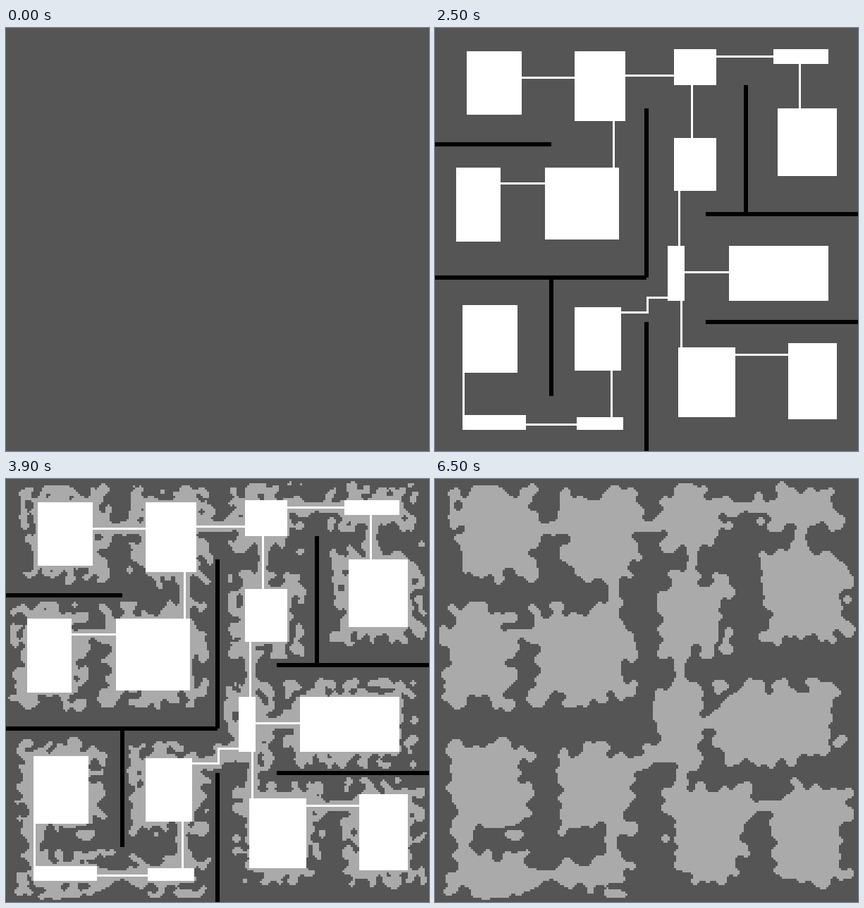
An HTML page with a canvas that plays this animation: 600x600 px, repeating every 8000 ms.

```html
<!DOCTYPE html>
<html>
<head>
<meta charset="utf-8">
<style>
  html, body { margin: 0; height: 100%; overflow: hidden; background: #555; }
  canvas, svg { position: absolute; left: 0; top: 0; width: 600px; height: 600px; }
  canvas { image-rendering: pixelated; }
  rect { fill: #fff; }
  #borders rect { fill: none; stroke: #0f0; }
  #walls rect { fill: #000; }
  line { stroke: #f00; }
  #neighbours line { stroke-width: .33334; }
</style>
</head>
<body>
<canvas width="200" height="200"></canvas>
<svg viewBox="0 0 200 200" shape-rendering="crispEdges">
  <g id="rooms"></g>
  <g id="corridors"></g>
  <g id="walls"></g>
  <g id="borders"></g>
  <g id="neighbours"></g>
  <g id="tree"></g>
</svg>
<script>
const SIZE = 200, LOOP = 8000, STEPS = 15, ROOM_PAD = 9, CORRIDOR_PAD = 3;
const ctx = document.querySelector('canvas').getContext('2d');

// Binary space partition in preorder: axis and position of each cut, '.' for a leaf.
const cuts = ('x100 y118 y55 x55 . . x42 . . x55 y173 . . y174 . . ' +
  'y88 x147 y38 . . y27 . . y139 x128 . . x156 . .').split(' ');

// x, y, width, height in cells, one room per leaf.
const rooms = [
  [15, 11, 26, 30], [66, 11, 24, 33], [10, 66, 21, 35], [52, 66, 35, 34],
  [13, 131, 26, 32], [13, 183, 30, 7], [66, 132, 22, 30], [67, 184, 22, 6],
  [113, 10, 20, 17], [113, 52, 20, 25], [160, 10, 26, 7], [162, 38, 28, 32],
  [110, 103, 8, 26], [139, 103, 47, 26], [115, 151, 27, 33], [167, 149, 23, 36]
];

// Spanning tree: cross position of the corridor, two values when it bends.
const links = {
  '0-1': [23], '1-3': [84], '2-3': [73], '1-8': [22], '8-10': [13],
  '10-11': [172], '8-9': [121], '9-12': [115], '12-13': [115], '12-14': [116],
  '14-15': [154], '6-12': [134, 127], '6-7': [83], '5-7': [187], '4-5': [13]
};

const leaves = [];
function split(x0, y0, x1, y1) {
  const cut = cuts.shift(), at = +cut.slice(1);
  if (cut === '.') {
    leaves.push({ x0, y0, x1, y1, cx: (x0 + x1) >> 1, cy: (y0 + y1) >> 1 });
  } else if (cut[0] === 'x') {
    split(x0, y0, at, y1);
    split(at, y0, x1, y1);
  } else {
    split(x0, y0, x1, at);
    split(x0, at, x1, y1);
  }
}
split(0, 0, SIZE, SIZE);

function draw(group, tag, attributes) {
  const node = document.createElementNS('http://www.w3.org/2000/svg', tag);
  for (const name in attributes) node.setAttribute(name, attributes[name]);
  document.getElementById(group).append(node);
}
const drawRect = (group, [x, y, width, height]) => draw(group, 'rect', { x, y, width, height });
const drawLine = (group, a, b) =>
  draw(group, 'line', { x1: a.cx, y1: a.cy, x2: b.cx, y2: b.cy });

function corridorRects(a, b, sideways, border, [from, to = from]) {
  const [ax, ay, aw, ah] = rooms[a], [bx, by] = rooms[b];
  if (!sideways) return [[from, ay + ah, 1, by - ay - ah]];
  return [
    [ax + aw, from, border - ax - aw + 1, 1],
    [border, Math.min(from, to), 1, Math.abs(from - to) + 1],
    [border, to, bx - border, 1]
  ];
}

const corridors = [], walls = [];
leaves.forEach((a, i) => {
  drawRect('borders', [a.x0, a.y0, a.x1 - a.x0, a.y1 - a.y0]);
  leaves.forEach((b, j) => {
    const left = Math.max(a.x0, b.x0), width = Math.min(a.x1, b.x1) - left;
    const top = Math.max(a.y0, b.y0), height = Math.min(a.y1, b.y1) - top;
    const sideways = a.x1 === b.x0 && height > 0;
    if (!sideways && !(a.y1 === b.y0 && width > 0)) return;
    drawLine('neighbours', a, b);
    const link = links[`${i}-${j}`];
    if (link) {
      drawLine('tree', a, b);
      corridors.push(...corridorRects(i, j, sideways, a.x1, link));
    } else {
      walls.push(sideways ? [a.x1 - 1, top, 2, height] : [left, a.y1 - 1, width, 2]);
    }
  });
});
rooms.forEach(r => drawRect('rooms', r));
corridors.forEach(r => drawRect('corridors', r));
walls.forEach(r => drawRect('walls', r));

let seed = 20;
function random() {
  seed = (seed + 0x6D2B79F5) | 0;
  let r = Math.imul(seed ^ (seed >>> 15), 1 | seed);
  r = (r + Math.imul(r ^ (r >>> 7), 61 | r)) ^ r;
  return ((r ^ (r >>> 14)) >>> 0) / 4294967296;
}

function fill(grid, [x, y, w, h], value, pad = 0) {
  for (let v = Math.max(0, y - pad); v < Math.min(SIZE, y + h + pad); v++)
    for (let u = Math.max(0, x - pad); u < Math.min(SIZE, x + w + pad); u++)
      grid[v * SIZE + u] = value;
}

// The floor of a corridor reaches one cell beyond its white line.
const newGrid = () => new Uint8Array(SIZE * SIZE);
const FLOOR = 1, WALL = 2;
const noisy = newGrid(), fixed = newGrid();
rooms.forEach(r => fill(noisy, r, 1, ROOM_PAD));
corridors.forEach(r => fill(noisy, r, 1, CORRIDOR_PAD));
walls.forEach(r => fill(fixed, r, WALL));
rooms.forEach(r => fill(fixed, r, FLOOR));
corridors.forEach(r => fill(fixed, r, FLOOR, 1));

// Majority vote of the eight neighbours; a tie keeps the cell.
function smooth(grid) {
  const at = (x, y) => x >= 0 && y >= 0 && x < SIZE && y < SIZE ? grid[y * SIZE + x] : 0;
  return grid.map((cell, i) => {
    if (fixed[i]) return cell;
    const x = i % SIZE, y = (i - x) / SIZE;
    const count = at(x - 1, y - 1) + at(x, y - 1) + at(x + 1, y - 1) + at(x - 1, y) +
      at(x + 1, y) + at(x - 1, y + 1) + at(x, y + 1) + at(x + 1, y + 1);
    return count === 4 ? cell : +(count > 4);
  });
}

const caves = [noisy.map((n, i) => fixed[i] ? +(fixed[i] === FLOOR) : +(n && random() < .5))];
while (caves.length <= STEPS) caves.push(smooth(caves[caves.length - 1]));

function paintCave(step) {
  ctx.clearRect(0, 0, SIZE, SIZE);
  if (step < 0) return;
  ctx.fillStyle = '#aaa';
  caves[step].forEach((cell, i) => {
    if (cell) ctx.fillRect(i % SIZE, Math.floor(i / SIZE), 1, 1);
  });
}

const shown = {
  borders: [500, 2500], rooms: [1000, 6500], neighbours: [1500, 2500],
  tree: [2000, 2500], corridors: [2500, 6500], walls: [2500, 6500]
};
let painted = -1;
function frame() {
  const t = performance.now() % LOOP;
  for (const id in shown) {
    const [from, to] = shown[id];
    document.getElementById(id).style.display = t >= from && t < to ? '' : 'none';
  }
  const step = t < 3000 ? -1 : Math.min(STEPS, Math.max(0, Math.floor((t - 3300) / 200)));
  if (step !== painted) paintCave(painted = step);
  requestAnimationFrame(frame);
}
frame();
</script>
</body>
</html>
```
